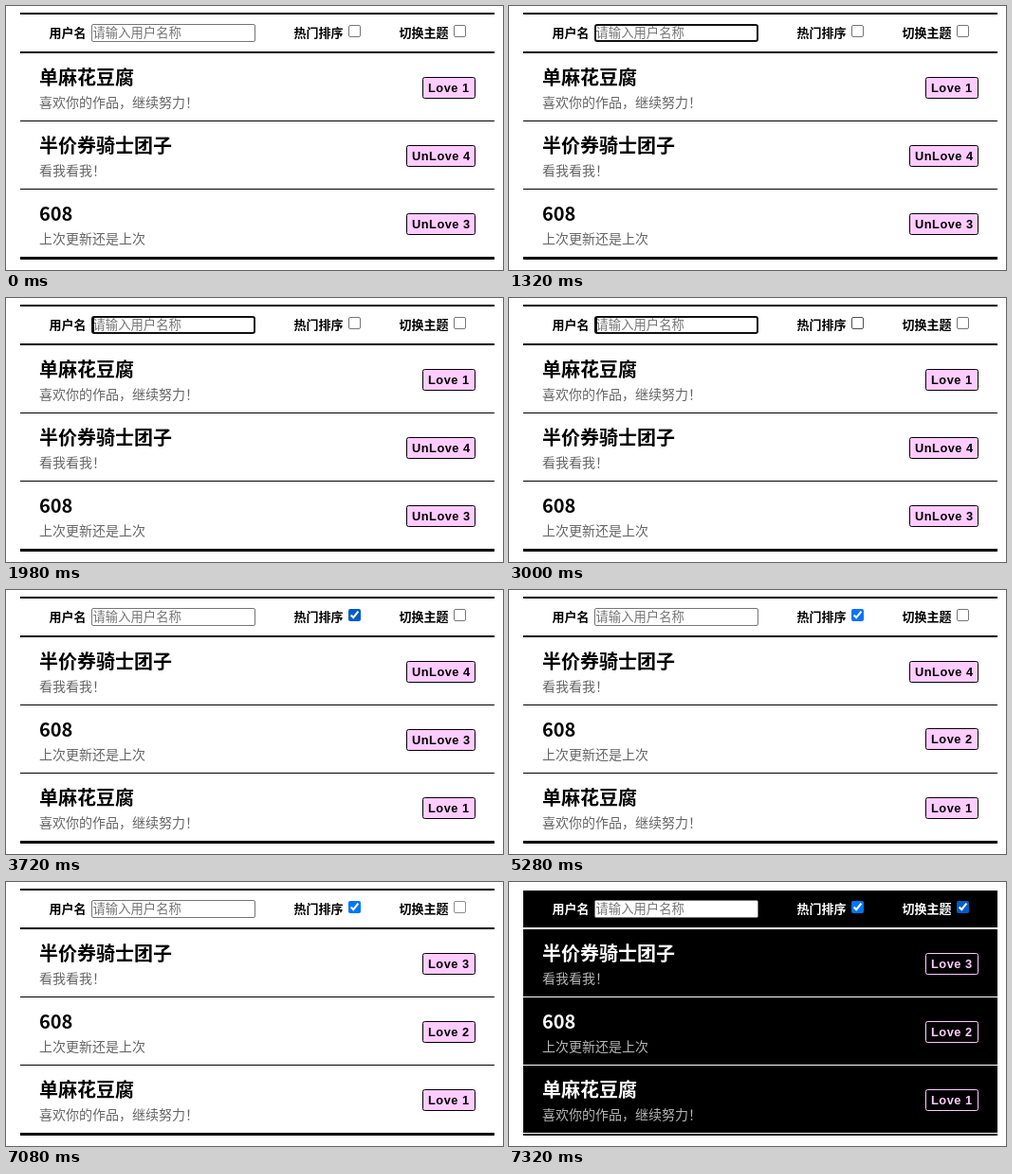
Recreate the animation shown at these times as an HTML page. Size 524 by 279 pixels, loop 8 s.

```html
<!DOCTYPE html>
<html lang="zh-CN">
<head>
<meta charset="utf-8">
<style>
  html, body { margin: 0; width: 100%; height: 100%; overflow: hidden; background: #fff; }
  svg { display: block; font-family: "Noto Sans CJK SC", "Noto Sans CJK", "Noto Sans SC", sans-serif; }
  .label { font-size: 13px; font-weight: bold; }
  .title { font-size: 20px; font-weight: bold; }
  .note { font-size: 14px; }
  .field { font-size: 13.333px; }
  .value { font: 13.333px "Liberation Sans", Arial, sans-serif; }
  .button { font: bold 12.8px "Liberation Sans", Arial, sans-serif; letter-spacing: .5px; }
</style>
</head>
<body>
<svg id="stage" width="524" height="279"></svg>
<script>
const LOOP = 8000, ROW = 72;
const stage = document.getElementById('stage');

const people = [
  { name: '单麻花豆腐', note: '喜欢你的作品，继续努力！' },
  { name: '半价券骑士团子', note: '看我看我！' },
  { name: '608', note: '上次更新还是上次' },
];

const rect = (x, y, w, h, fill, extra = '') =>
  `<rect x="${x}" y="${y}" width="${w}" height="${h}" fill="${fill}" ${extra}/>`;
const text = (x, y, kind, fill, content) =>
  `<text x="${x}" y="${y}" class="${kind}" fill="${fill}">${content}</text>`;
const outline = (x, y, w, h, fill, stroke, radius = 2) =>
  rect(x + .5, y + .5, w - 1, h - 1, fill, `stroke="${stroke}" rx="${radius}"`);

function checkbox(x, { checked, hover, pressed }) {
  const y = 20;
  if (!checked) {
    return outline(x, y, 13, 13, '#fff', pressed ? '#8d8d8d' : hover ? '#4f4f4f' : '#767676', 1.5);
  }
  return rect(x, y, 13, 13, hover ? '#005cc8' : '#0075ff', 'rx="2"') +
    `<path d="M${x + 2.6} ${y + 6.5}l2.6 2.6l5.2 -6.5" fill="none" stroke="#fff" stroke-width="2.08"/>`;
}

function input({ hover, focus, caret, typed }) {
  const box = focus
    ? rect(91, 20, 171, 17, '#fff', 'stroke="#101010" stroke-width="2" rx="2"')
    : outline(90, 19, 173, 19, '#fff', hover ? '#4f4f4f' : '#767676', 1.5);
  const content = typed
    ? text(92, 33, 'value', '#000', typed)
    : text(91.5, 33, 'field', '#757575', '请输入用户名称');
  return box + content + (caret ? rect(typed ? 99 : 92, 21, 1, 15, '#000') : '');
}

function loveButton(row, { loved, count, hover }, dark) {
  const width = loved ? 73 : 56, x = 495 - width;
  const y = 75 + row * ROW - (hover ? 1 : 0);
  const pink = '#fcf';
  return outline(x, y, width, 23, dark ? '#000' : pink, dark ? pink : '#000') +
    text(x + 6, y + 16, 'button', dark ? pink : '#000', `${loved ? 'UnLove' : 'Love'} ${count}`);
}

function picture(t) {
  const within = (from, to) => t >= from && t < to;
  const dark = t >= 7320, sorted = t >= 3720, filtered = within(1500, 1980);
  const fg = dark ? '#fff' : '#000', bg = dark ? '#000' : '#fff';

  const buttons = [
    { loved: false, count: 1 },
    { loved: t < 6300, count: t < 6300 ? 4 : 3, hover: within(5760, 6540) },
    { loved: t < 5280, count: t < 5280 ? 3 : 2, hover: within(4680, 5640) },
  ];
  const order = filtered ? [2] : sorted ? [1, 2, 0] : [0, 1, 2];
  const bottom = 50 + order.length * ROW;

  const header =
    rect(15, 7, 500, 2, fg) + rect(15, 48, 500, 2, fg) +
    text(45.5, 32.5, 'label', fg, '用户名') +
    input({
      hover: within(480, 720),
      focus: within(720, 3480),
      caret: within(720, 1320) || within(1500, 2520) || within(3000, 3480),
      typed: filtered ? '0' : '',
    }) +
    text(303.5, 32.5, 'label', fg, '热门排序') +
    checkbox(361, { checked: sorted, hover: within(2880, 3960), pressed: within(3480, 3720) }) +
    text(414.5, 32.5, 'label', fg, '切换主题') +
    checkbox(472, {
      checked: dark,
      hover: within(60, 120) || t >= 6720,
      pressed: within(7080, 7320),
    });

  const rows = order.map((id, row) => {
    const y = 50 + row * ROW;
    return text(35, y + 33, 'title', fg, people[id].name) +
      text(35, y + 57, 'note', dark ? '#b4b4b4' : '#666', people[id].note) +
      loveButton(row, buttons[id], dark) +
      rect(15, y + ROW - 1, 500, 1, fg);
  });

  return rect(15, 7, 500, bottom - 7, bg) + header + rows.join('') + rect(15, bottom, 500, 2, '#000');
}

let shown = '';
function frame() {
  const next = picture(performance.now() % LOOP);
  if (next !== shown) stage.innerHTML = shown = next;
  requestAnimationFrame(frame);
}
frame();
</script>
</body>
</html>
```
